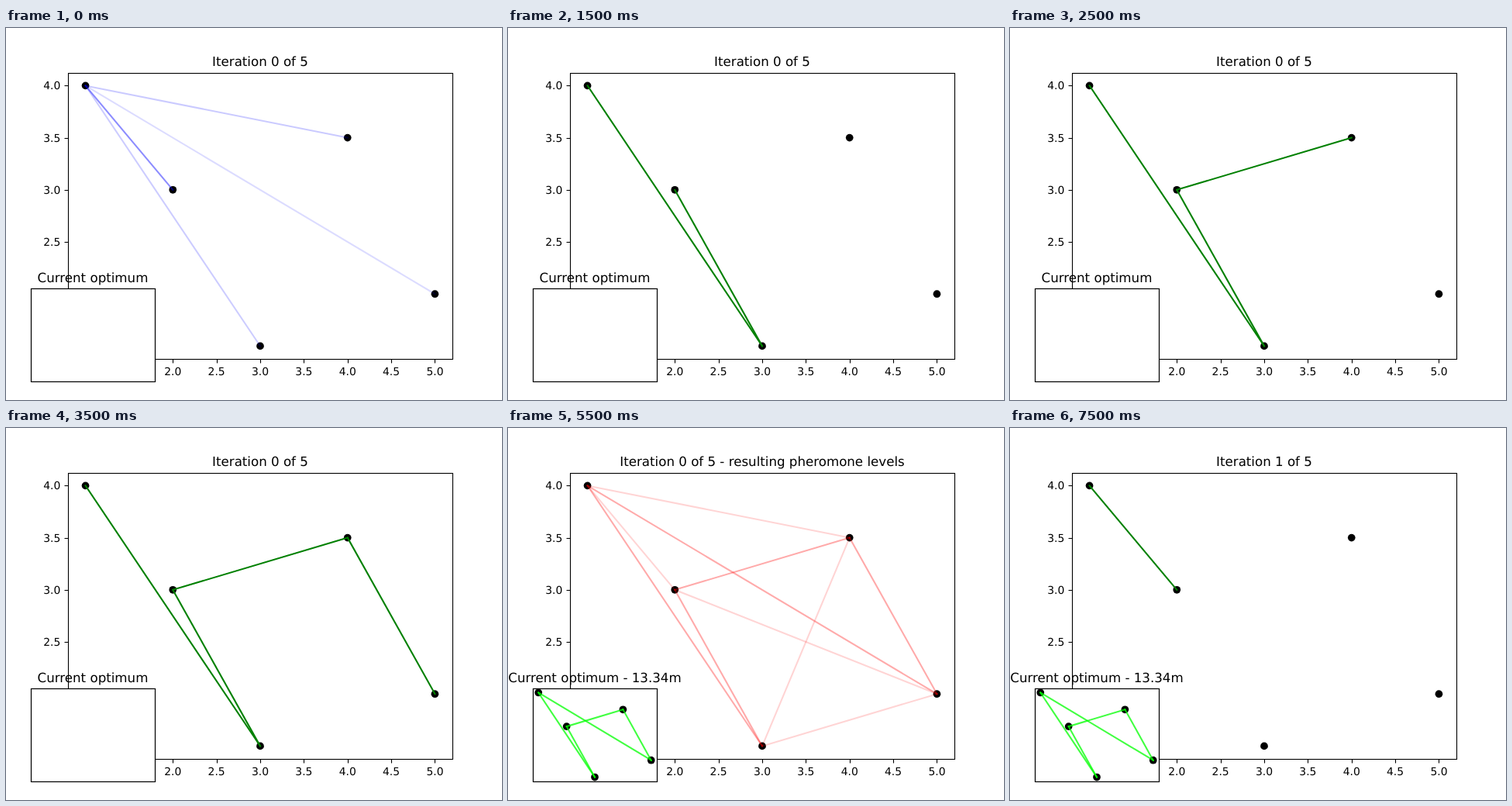
These frames come from a looping animation (640 by 480 pixels, 8000 ms). An HTML page:

```html
<!DOCTYPE html>
<html lang="en">
<head>
<meta charset="utf-8">
<title>Ant colony tour</title>
<style>
  html, body { margin: 0; width: 100%; height: 100%; overflow: hidden; background: #fff; }
  svg { display: block; width: 640px; height: 480px; }
  text { font: 13.889px "DejaVu Sans", sans-serif; text-rendering: geometricPrecision; }
  .title { font-size: 16.667px; text-anchor: middle; }
  .frame { fill: none; stroke: #000; stroke-width: 1.11; }
  .edges { stroke-width: 2.083; stroke-linecap: square; }
</style>
</head>
<body>
<svg id="stage" viewBox="0 0 640 480"></svg>
<script>
const NS = "http://www.w3.org/2000/svg";
const LOOP = 8000;
const svg = document.getElementById("stage");

const cities = { A: [1, 4], B: [2, 3], C: [3, 1.5], D: [4, 3.5], E: [5, 2] };
const tour = ["AC", "CB", "BD", "DE", "EA"];
const others = ["AB", "AD", "BE", "CD", "CE"];

const main = { x: 80, y: 57.6, w: 496, h: 369.6 };
const inset = { x: 32, y: 336, w: 160, h: 120 };

function add(parent, tag, attrs, text) {
  const el = document.createElementNS(NS, tag);
  for (const k in attrs) el.setAttribute(k, attrs[k]);
  if (text) el.textContent = text;
  return parent.appendChild(el);
}

const snap = v => Math.floor(v + 0.5) + 0.5;
const place = (box, [x, y]) => [
  box.x + box.w * (x - 0.8) / 4.4,
  box.y + box.h * (4.125 - y) / 2.75
];

function drawFrame(box, fill) {
  const x = snap(box.x), y = snap(box.y);
  add(svg, "rect", {
    class: "frame", x, y, style: "fill:" + fill,
    width: snap(box.x + box.w) - x, height: snap(box.y + box.h) - y
  });
}

function drawDots(parent, box) {
  for (const k in cities) {
    const [cx, cy] = place(box, cities[k]);
    add(parent, "circle", { cx, cy, r: 4.86 });
  }
}

function drawEdge(parent, box, [a, b], stroke, alpha) {
  const [x1, y1] = place(box, cities[a]);
  const [x2, y2] = place(box, cities[b]);
  add(parent, "line", { x1, y1, x2, y2, stroke, "stroke-opacity": alpha });
}

function drawTicks() {
  for (let v = 2; v <= 5; v += 0.5) {
    const x = place(main, [v, 0])[0];
    add(svg, "path", { class: "frame", d: `M${snap(x)} 427.5v5` });
    add(svg, "text", { x, y: 448, "text-anchor": "middle" }, v.toFixed(1));
  }
  for (let v = 2.5; v <= 4; v += 0.5) {
    const y = place(main, [0, v])[1];
    add(svg, "path", { class: "frame", d: `M80.5 ${snap(y)}h-5` });
    add(svg, "text", { x: 70.3, y: Math.round(y + 5), "text-anchor": "end" }, v.toFixed(1));
  }
}

// Chance of each next city: pheromone over distance, normalised
function choices(from, left, pheromone = () => 1) {
  const weights = [...left].map(to => {
    const [x1, y1] = cities[from], [x2, y2] = cities[to];
    return pheromone(from + to) / Math.hypot(x2 - x1, y2 - y1);
  });
  const sum = weights.reduce((a, b) => a + b);
  return [...left].map((to, i) => [from + to, "#00f", weights[i] / sum]);
}

const inTour = e => tour.includes(e) || tour.includes(e[1] + e[0]);
const walked = n => tour.slice(0, n).map(e => [e, "#008000", 1]);
const marked = (edges, alpha) => edges.map(e => [e, "#f00", alpha]);

const first = "Iteration 0 of 5", second = "Iteration 1 of 5", length = " - 13.34m";
const steps = [
  [0, first, choices("A", "BCDE")],
  [500, first, walked(1)],
  [1000, first, [...walked(1), ...choices("C", "BDE")]],
  [1500, first, walked(2)],
  [2000, first, [...walked(2), ...choices("B", "DE")]],
  [2500, first, walked(3)],
  [3000, first, [...walked(3), ...choices("D", "E")]],
  [3500, first, walked(4)],
  [4000, first + length, walked(5)],
  [5500, first + " - resulting pheromone levels",
    [...marked(others, 1 / 6), ...marked(tour, 1 / 3)]],
  [7000, second, choices("A", "BCDE", e => inTour(e) ? 2 : 1)],
  [7500, second, [["AB", "#008000", 1]]]
];

drawFrame(main, "#fff");
drawTicks();
drawDots(svg, main);
const edges = add(svg, "g", { class: "edges" });
const title = add(svg, "text", { class: "title", x: 328, y: 49 });
drawFrame(inset, "#fff");
const best = add(svg, "g", { class: "edges" });
drawDots(best, inset);
tour.forEach(e => drawEdge(best, inset, e, "#0f0", 0.75));
drawFrame(inset, "none");
const bestTitle = add(svg, "text", { class: "title", x: 112, y: 328 });

let shown = null;
function render(t) {
  const step = steps.filter(s => s[0] <= t).pop();
  if (step === shown) return;
  shown = step;
  const [start, label, lines] = step;
  const found = start >= 4000;
  title.textContent = label;
  bestTitle.textContent = "Current optimum" + (found ? length : "");
  best.style.display = found ? "" : "none";
  edges.replaceChildren();
  lines.forEach(l => drawEdge(edges, main, ...l));
}

const begin = performance.now();
function tick() {
  render((performance.now() - begin) % LOOP);
  requestAnimationFrame(tick);
}
tick();
</script>
</body>
</html>
```
